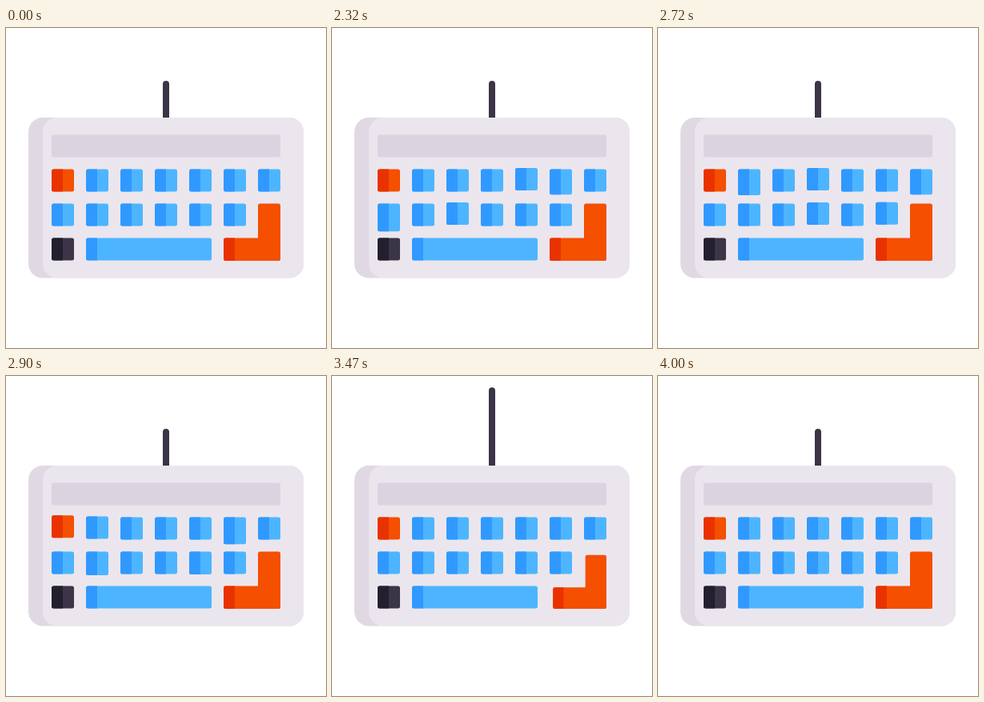
An HTML page with a canvas for the animation above (4020 ms loop, 400x400 px).

```html
<!DOCTYPE html>
<html lang="en">
<head>
<meta charset="utf-8">
<title>Keyboard</title>
<style>
html, body { margin: 0; width: 100%; height: 100%; overflow: hidden; background: #fff; }
canvas { display: block; width: 400px; height: 400px; }
</style>
</head>
<body>
<canvas id="stage" width="400" height="400"></canvas>
<script>
const ctx = document.getElementById('stage').getContext('2d');
const LOOP = 4020, START = 2020, END = 4000;
const BLUE = ['#3099ff', '#4db5ff'];
const RED = ['#e93200', '#f54f00'];
const DARK = ['#231f2f', '#3b3547'];

// Press start times, by "row,column"
const presses = {
  '0,2': [1995], '0,6': [2065, 2644], '1,2': [2130], '0,4': [2185],
  '0,5': [2244, 2840], '1,0': [2272], '2,1': [2350], '2,0': [2400],
  '1,3': [2530], '1,5': [2545], '0,3': [2585, 3050], '0,1': [2688],
  '0,0': [2740, 3590], '1,4': [2795], '1,1': [2890]
};
// Bottom edge travel: push down, rebound, settle
const curve = [[0, 0], [50, 7], [110, 0], [150, -2.5], [250, 0]];

function travel(age) {
  for (let i = 1; i < curve.length; i++) {
    const [a, from] = curve[i - 1], [b, to] = curve[i];
    if (age >= a && age < b) return from + (to - from) * (age - a) / (b - a);
  }
  return 0;
}

function box(x, y, w, h, r, color) {
  ctx.fillStyle = color;
  ctx.beginPath();
  ctx.roundRect(x, y, w, h, r);
  ctx.fill();
}

function key(row, col, colors, t, w = 28) {
  let d = 0;
  for (const s of presses[row + ',' + col] || []) d += travel(t - s);
  const x = 57 + col * 43;
  const y = 176.5 + row * 43 + Math.min(d, 0);
  const h = 28 + Math.max(d, 0);
  box(x, y, w, h, 2.5, colors[1]);
  box(x, y, 14, h, [2.5, 0, 0, 2.5], colors[0]);
}

function enterKey(scale) {
  ctx.save();
  ctx.translate(343, 291);
  ctx.scale(scale, scale);
  box(-28, -71.5, 28, 71.5, 2.5, RED[1]);
  box(-71, -28.5, 71, 28.5, 2.5, RED[1]);
  box(-71, -28.5, 14, 28.5, [2.5, 0, 0, 2.5], RED[0]);
  ctx.restore();
}

// Smooth rise to 1 and back between two times
function bell(t, from, peak, to) {
  if (t <= from || t >= to) return 0;
  const p = t < peak ? (t - from) / (peak - from) : (to - t) / (to - peak);
  return Math.sin(p * Math.PI / 2) ** 2;
}

function draw(t) {
  if (t < START || t >= END) t = 0;
  const pull = bell(t, 3095, 3510, 4000);
  ctx.fillStyle = '#fff';
  ctx.fillRect(0, 0, 400, 400);

  const top = 66 - 53 * pull;
  box(196, top, 8, 120 - top, [4, 4, 0, 0], '#3b3547');

  box(28, 112, 344, 200.5, 18, '#e0d9e3');
  box(46, 112, 326, 200.5, 18, '#ebe6ed');
  box(57, 133.5, 286, 28, 2.5, '#dad4e0');

  for (let col = 0; col < 7; col++) {
    key(0, col, col ? BLUE : RED, t);
    if (col < 6) key(1, col, BLUE, t);
  }
  key(2, 0, DARK, t);
  key(2, 1, BLUE, t, 157);
  enterKey(1 - 0.062 * pull);
}

const begin = performance.now();
function tick() {
  draw((performance.now() - begin) % LOOP);
  requestAnimationFrame(tick);
}
tick();
</script>
</body>
</html>
```
